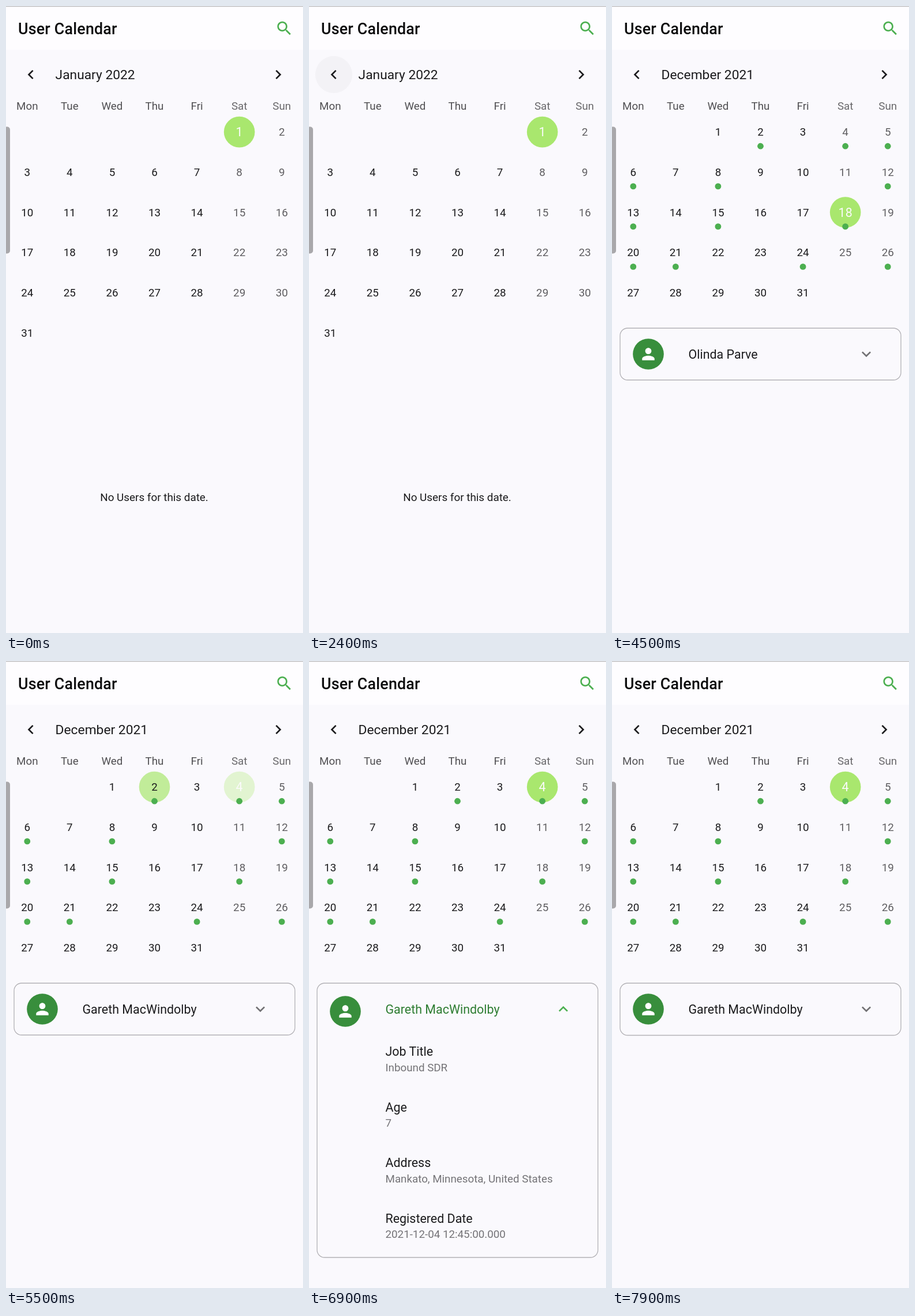
An HTML page that plays this animation: 515 by 1088 pixels, repeating every 8 s.

```html
<!DOCTYPE html>
<html lang="en">
<head>
<meta charset="utf-8">
<title>User Calendar</title>
<style>
  html, body { margin: 0; width: 100%; height: 100%; overflow: hidden; background: #faf9fd; }
  svg { display: block; width: 100%; height: 100%; font-family: Roboto, sans-serif; }
</style>
</head>
<body>
<svg id="stage" viewBox="0 0 515 1088"></svg>
<script>
const LOOP = 8000;
const DP = 515 / 384; // one layout unit in stage pixels
const BODY = 14 * DP, LARGE = 16 * DP;
const INK = '#1b1b1d', WEEKEND = '#5e5d60', GREEN = '#4caf50', LIME = '#a9e76e';
const ICONS = {
  left: 'M15.41 7.41L14 6l-6 6 6 6 1.41-1.41L10.83 12z',
  right: 'M10 6L8.59 7.41 13.17 12l-4.58 4.59L10 18l6-6z',
  down: 'M16.59 8.59L12 13.17 7.41 8.59 6 10l6 6 6-6z',
  search: 'M15.5 14h-.79l-.28-.27C15.41 12.59 16 11.11 16 9.5 16 5.91 13.09 3 9.5 3S3 5.91 3 9.5 5.91 16 9.5 16c1.61 0 3.09-.59 4.23-1.57l.27.28v.79l5 4.99L20.49 19l-4.99-5zm-6 0C7.01 14 5 11.99 5 9.5S7.01 5 9.5 5 14 7.01 14 9.5 11.99 14 9.5 14z',
  person: 'M12 12c2.21 0 4-1.79 4-4s-1.79-4-4-4-4 1.79-4 4 1.79 4 4 4zm0 2c-2.67 0-8 1.34-8 4v2h16v-2c0-2.66-5.33-4-8-4z'
};

const stage = document.getElementById('stage');

function set(node, attrs) {
  for (const key in attrs) node.setAttribute(key, attrs[key]);
  return node;
}
function add(parent, tag, attrs = {}) {
  return parent.appendChild(set(document.createElementNS('http://www.w3.org/2000/svg', tag), attrs));
}
function label(parent, text, x, y, size, fill, attrs = {}) {
  const node = add(parent, 'text', { x, y, 'font-size': size, fill, ...attrs });
  node.textContent = text;
  return node;
}
const place = (x, y, turn = 0) => `translate(${x} ${y}) rotate(${turn}) scale(${DP}) translate(-12 -12)`;
const icon = (parent, name, x, y, fill) =>
  add(parent, 'path', { d: ICONS[name], fill, transform: place(x, y) });
const show = (node, on) => node.setAttribute('visibility', on ? 'visible' : 'hidden');

const progress = (t, start, length) => Math.min(1, Math.max(0, (t - start) / length));
const easeIn = x => x ** 1.7;
const easeOut = x => 1 - (1 - x) ** 1.7;
const mix = (a, b, k) => `rgb(${a.map((v, i) => Math.round(v + (b[i] - v) * k))})`;
const centred = { 'text-anchor': 'middle' };
const columnX = col => 515 / 7 * (col + 0.5);

// Timeline
const PAGE_START = 2480, PAGE_TIME = 300, FADE = 250;
const PICK_18 = 3700, PICK_2 = 4700, PICK_4 = 5425;
const OPEN = { start: 6512, length: 300 }, CLOSE = { start: 7460, length: 450 };

// App bar
add(stage, 'rect', { width: 515, height: 1088, fill: '#faf9fd' });
add(stage, 'rect', { width: 515, height: 76, fill: '#fefdff' });
add(stage, 'rect', { width: 515, height: 1.3, fill: '#bcbbbe' });
label(stage, 'User Calendar', 21, 49, 20 * DP, '#0b0b0c', { 'font-weight': 500, 'letter-spacing': 0.2 });
icon(stage, 'search', 482.5, 38.8, GREEN);

// Calendar header
const ripple = add(stage, 'circle', { cx: 43, cy: 119, r: 32.2, fill: '#000' });
icon(stage, 'left', 43, 119, INK);
icon(stage, 'right', 472, 119, INK);
const monthName = label(stage, '', 85.6, 127, 17 * DP, INK);
['Mon', 'Tue', 'Wed', 'Thu', 'Fri', 'Sat', 'Sun'].forEach((day, col) =>
  label(stage, day, columnX(col), 180, BODY, col > 4 ? '#69686b' : '#4f4e51', centred));

// Month pages
const picks = [];
function buildMonth(firstCol, dotted, picked) {
  const page = add(stage, 'g');
  for (let day = 1; day <= 31; day++) {
    const cell = firstCol + day - 1, col = cell % 7;
    const x = columnX(col), y = 218.6 + 52 * DP * Math.floor(cell / 7);
    const fill = col > 4 ? WEEKEND : INK;
    const disc = picked[day] && add(page, 'circle', { cx: x, cy: y, r: 20 * DP, fill: LIME });
    const text = label(page, day, x, y + 6.5, BODY, fill, centred);
    if (disc) picks.push({ disc, text, y, fill, from: picked[day][0], to: picked[day][1] });
    if (dotted.includes(day)) add(page, 'circle', { cx: x, cy: y + 24.6, r: 5.4, fill: GREEN });
  }
  return page;
}
const january = buildMonth(5, [], { 1: [-LOOP, 2 * LOOP] });
const december = buildMonth(2, [2, 4, 5, 6, 8, 12, 13, 15, 18, 20, 21, 24, 26], {
  18: [PICK_18, PICK_2], 2: [PICK_2, PICK_4], 4: [PICK_4, 2 * LOOP]
});
const emptyNote = label(stage, 'No Users for this date.', 257, 859, BODY + 0.1, INK, centred);

// User card
const HEAD = 649, DETAILS = 386;
const card = add(stage, 'g');
const frame = add(card, 'rect', {
  x: 14, y: 559, width: 487, height: 90, rx: 13, fill: 'none', stroke: '#b3b2b6', 'stroke-width': 1.3
});
const avatar = add(card, 'g');
add(avatar, 'circle', { cx: 63, cy: 604, r: 20 * DP, fill: '#388e3c' });
icon(avatar, 'person', 63, 604, '#fff');
const userName = label(card, '', 132.5, 611.5, LARGE, INK);
const arrow = icon(card, 'down', 441, 604, INK);

const clip = add(add(stage, 'clipPath', { id: 'fold' }), 'rect', { x: 14, y: HEAD, width: 487 });
const details = add(add(card, 'g', { 'clip-path': 'url(#fold)' }), 'g');
[
  ['Job Title', 'Inbound SDR'],
  ['Age', '7'],
  ['Address', 'Mankato, Minnesota, United States'],
  ['Registered Date', '2021-12-04 12:45:00.000']
].forEach(([title, value], i) => {
  const y = 685 + 96.5 * i;
  label(details, title, 132.5, y, LARGE, INK);
  label(details, value, 132.5, y + 26.6, BODY, '#747377');
});

// Edge handle
add(stage, 'rect', { x: -8, y: 209.5, width: 15, height: 220, rx: 5, fill: '#a9a8ab' });

function drawCalendar(t) {
  const slide = easeOut(progress(t, PAGE_START, PAGE_TIME));
  set(january, { transform: `translate(${515 * slide} 0)` });
  set(december, { transform: `translate(${515 * (slide - 1)} 0)` });
  show(january, slide < 1);
  show(december, slide > 0);
  monthName.textContent = slide < 0.5 ? 'January 2022' : 'December 2021';
  ripple.setAttribute('opacity', 0.028 * (progress(t, 2320, 80) - progress(t, 2550, 300)));

  for (const { disc, text, y, fill, from, to } of picks) {
    const on = t >= from && t < to;
    disc.setAttribute('opacity', progress(t, from, FADE) - progress(t, to, FADE));
    set(text, { fill: on ? '#fafafa' : fill, 'font-size': on ? LARGE : BODY, y: y + (on ? 7.5 : 6.5) });
  }
  emptyNote.setAttribute('y', 859 - 34.7 * easeOut(progress(t, PAGE_START + 90, 200)));
  show(emptyNote, t < PICK_18);
}

function drawCard(t) {
  show(card, t >= PICK_18);
  userName.textContent = t < PICK_2 ? 'Olinda Parve' : t < PICK_4 ? 'Tamsin Oldrake' : 'Gareth MacWindolby';

  const open = easeIn(progress(t, OPEN.start, OPEN.length) - progress(t, CLOSE.start, CLOSE.length));
  const height = DETAILS * open;
  frame.setAttribute('height', 90 + height);
  clip.setAttribute('height', height);
  details.setAttribute('transform', `translate(0 ${(height - DETAILS) / 2})`);
  avatar.setAttribute('transform', `translate(0 ${4 * open})`);
  userName.setAttribute('fill', mix([27, 27, 29], [46, 125, 50], open));
  set(arrow, { transform: place(441, 604, 180 * open), fill: mix([113, 112, 115], [76, 175, 80], open) });
}

function draw(now) {
  const t = now % LOOP;
  drawCalendar(t);
  drawCard(t);
  requestAnimationFrame(draw);
}
draw(0);
</script>
</body>
</html>
```
